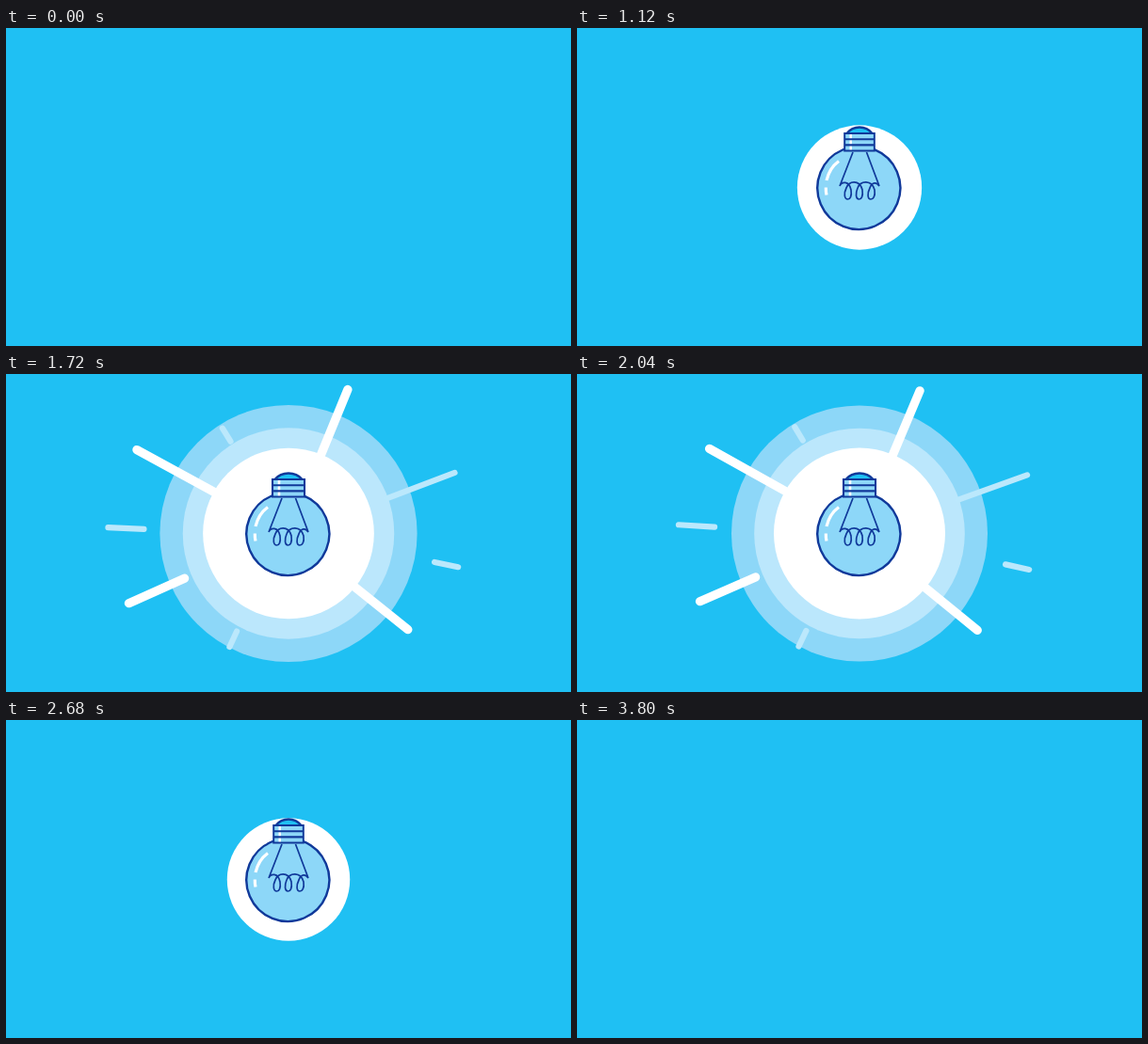
An HTML page without scripts that plays this animation: 600 px wide and 338 px high, repeating every 3.84 s.

```html
<!DOCTYPE html>
<html lang="en">
<head>
<meta charset="utf-8">
<title>Light bulb</title>
<style>
  html, body { margin: 0; width: 100%; height: 100%; overflow: hidden; background: #1fc0f3; }
  svg { display: block; width: 600px; height: 338px; }

  /* Everything plays forward, then backward; the half-step delay centres the turn. */
  svg * {
    animation-duration: 1920ms;
    animation-delay: -20ms;
    animation-iteration-count: infinite;
    animation-direction: alternate;
    animation-timing-function: linear;
  }

  .line { fill: none; stroke: #10399a; stroke-width: 2.4; }
  .thin-line { stroke-width: 1.7; }
  .shine { fill: none; stroke: #fff; stroke-width: 3.2; }

  .halo-outer { fill: #8dd7f8; animation-name: halo-outer; }
  .halo-inner { fill: #bbe7fc; animation-name: halo-inner; }
  .disc { fill: #fff; animation-name: disc; }

  .rays { fill: none; stroke-linecap: round; transform-origin: 300px 169.5px; }
  .bold { stroke: #fff; stroke-width: 9; animation-name: bold-turn, bold-pulse; }
  .fine { stroke: #bbe8fc; stroke-width: 6.4; animation-name: fine-turn, fine-pulse; }

  .bulb { animation-name: hop; animation-timing-function: ease-in-out; }
  .glass { fill: #8dd7f8; animation-name: fill-in; }
  .outline { animation-name: trace; }
  .filament { animation-name: coil; }
  .glint { animation-name: glint; }
  .dash { animation-name: dash; }
  .swing { transform-origin: 299.3px 170px; animation-name: swing; }
  .cap { transform-origin: 300px 131px; animation-name: grow; }

  @keyframes trace {
    0%, 1% { stroke-dasharray: 0 360; animation-timing-function: cubic-bezier(.333, 0, .667, .333); }
    36.5%, 100% { stroke-dasharray: 360 0; }
  }
  @keyframes hop {
    0%, 22% { translate: 0 4px; }
    34.4% { translate: 0 -6px; }
    38.5% { translate: 0 -9.5px; }
    45% { translate: 0 4px; }
    51% { translate: 0 -1px; }
    55%, 100% { translate: 0 0; }
  }
  @keyframes swing {
    0%, 23% { rotate: 66deg; }
    30.2% { rotate: 45deg; }
    34.4% { rotate: 26deg; }
    39%, 100% { rotate: 0deg; }
  }
  @keyframes grow {
    0%, 23% { scale: 0 0; }
    30.2% { scale: .7 .75; }
    34.4%, 59.4% { scale: .93 1; }
    64%, 100% { scale: 1 1; }
  }
  @keyframes coil {
    0%, 29% { stroke-dasharray: 0 100 0; }
    34.4% { stroke-dasharray: 3 87 10; }
    51%, 100% { stroke-dasharray: 45 0 55; }
  }
  @keyframes glint {
    0%, 28% { stroke-dasharray: 0 100; }
    34.4% { stroke-dasharray: 66 100; }
    38%, 100% { stroke-dasharray: 100 0; }
  }
  @keyframes dash {
    0%, 28% { stroke-dasharray: 0 100; }
    32%, 100% { stroke-dasharray: 100 0; }
  }
  @keyframes fill-in {
    0%, 40% { opacity: 0; }
    48%, 100% { opacity: 1; }
  }
  @keyframes disc {
    0%, 53% { r: 0px; }
    59.4% { r: 66px; }
    66% { r: 97px; }
    76% { r: 93.5px; }
    86% { r: 90.5px; }
    92.7% { r: 91px; }
    100% { r: 92px; }
  }
  @keyframes halo-inner {
    0%, 59.4% { r: 0px; }
    66% { r: 94px; }
    71% { r: 106px; }
    76% { r: 108.5px; }
    85% { r: 113.5px; }
    92.7% { r: 111.8px; }
    100% { r: 111px; }
  }
  @keyframes halo-outer {
    0%, 59.4% { r: 0px; }
    66% { r: 108px; }
    71% { r: 128px; }
    76% { r: 132.3px; }
    85% { r: 138.3px; }
    92.7% { r: 136px; }
    100% { r: 135px; }
  }
  @keyframes bold-turn {
    0%, 59.4% { rotate: -4.7deg; }
    100% { rotate: 6.7deg; }
  }
  @keyframes fine-turn {
    0%, 59.4% { rotate: -7.1deg; }
    100% { rotate: 10.2deg; }
  }
  @keyframes bold-pulse {
    0%, 59.4% { scale: 0; }
    70% { scale: .98; }
    76% { scale: 1; }
    88% { scale: 1.043; }
    92.7% { scale: 1.032; }
    100% { scale: 1; }
  }
  @keyframes fine-pulse {
    0%, 59.4% { scale: 0; }
    71% { scale: 1.005; }
    76% { scale: 1; }
    80% { scale: 1; }
    90% { scale: .962; }
    92.7% { scale: .966; }
    100% { scale: 1; }
  }
</style>
</head>
<body>
<svg viewBox="0 0 600 338">
  <circle class="halo-outer" cx="300" cy="169.5" r="0"/>
  <circle class="halo-inner" cx="300" cy="169.5" r="0"/>
  <path class="rays fine" d="M475 83 404 119M215 62 225.5 75.5M101.5 184.5 141 182M463.5 183.5 490 186M255 283 249 301"/>
  <path class="rays bold" d="M350 18 326 91M139 95 220 132M429 259 371 219M142 252.5 197 223"/>
  <circle class="disc" cx="300" cy="169.5" r="0"/>

  <g class="bulb">
    <circle class="glass" cx="299.3" cy="170" r="44"/>
    <circle class="line outline" r="44" pathLength="360" transform="translate(299.3 170) rotate(22) scale(1 -1)"/>
    <path class="shine glint" pathLength="100" d="M265 162Q268 149 278 141.5"/>
    <path class="shine dash" pathLength="100" d="M264.3 169.5Q264.2 174 265 177.5"/>
    <path class="line thin-line filament" pathLength="100" d="M293 132 279 168
      C281 163 289 162 291 172C292 179 290 182 287.5 182C284 182 283 176 286 170
      C289 162 300 161 303 172C304 179 302 182 299.5 182C296 182 295.5 176 298 170
      C301 162 313 161 316 172C317 179 314.5 182 312 182C308.5 182 308 176 311 170
      C313 164 318 163 321 168L307.5 132"/>
    <g class="swing">
      <g class="cap">
        <path class="line" style="fill:#1fc0f3" d="M285.5 112Q291 105.5 300 105.5T314.5 112"/>
        <path fill="#8dd7f8" d="M283 112H317V130.5H283Z"/>
        <path class="shine" style="stroke-width:2.6" d="M290 112V130"/>
        <path class="line" style="stroke-width:2.1" d="M283 112H317V130.5H283ZM283 118.2H317M283 124.4H317"/>
      </g>
    </g>
  </g>
</svg>
</body>
</html>
```
